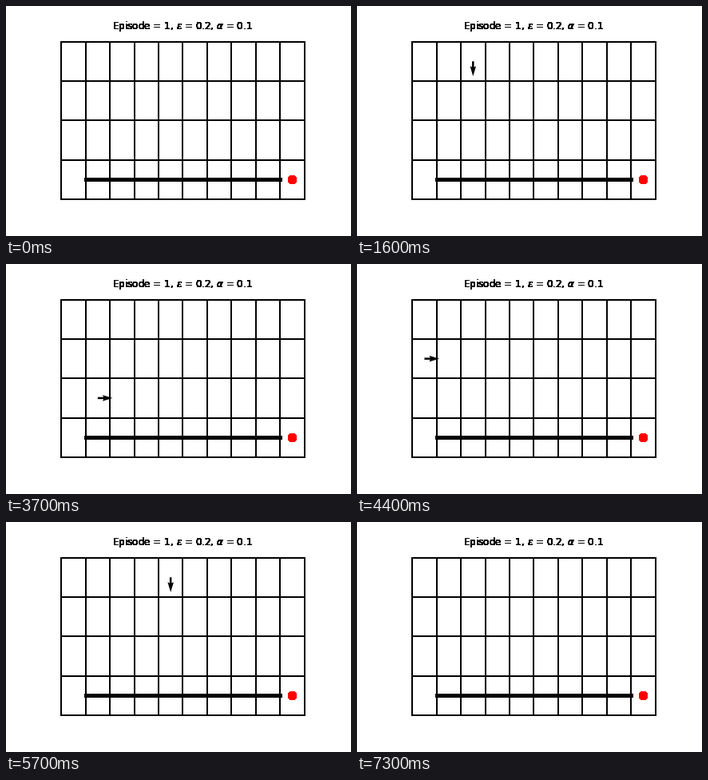
A matplotlib script that plays this animation: 432 px wide and 288 px high, repeating every 7400 ms.

```python
import matplotlib.pyplot as plt
from matplotlib.animation import FuncAnimation

W, H, DPI = 432, 288, 72
COLS, ROWS = 10, 4
FRAMES, INTERVAL = 74, 100
LAYERS = 24  # stacked copies give the text and dot hard edges

MOVES = {"U": (0, 1), "D": (0, -1), "L": (-1, 0), "R": (1, 0)}
ACTIONS = (
    "URRLUUDL" "DUURRLRD" "RRRRURLD"
    "DDUUURRL" "DLDRRRDU" "UUDRDLRR"
    "UDRRRUUL" "DDUURRDR" "URDURDDD"
)


def walk(actions):
    """List (cell, move) for each step; falling off the cliff restarts."""
    x, y = 0, 0
    steps = []
    for action in actions:
        dx, dy = MOVES[action]
        steps.append(((x + 0.5, y + 0.5), (dx, dy)))
        x, y = x + dx, y + dy
        if y == 0 and 0 < x < COLS - 1:
            x, y = 0, 0
    return steps


STEPS = walk(ACTIONS)

fig = plt.figure(figsize=(W / DPI, H / DPI), dpi=DPI, facecolor="white")
ax = fig.add_axes([0.125, 0.11, 0.775, 0.77])
ax.set_axis_off()
ax.set_xlim(-0.5, COLS + 0.5)
ax.set_ylim(-0.2937, 4.2045)

for i in range(COLS + 1):
    ax.plot([i, i], [0, ROWS], color="black", lw=2)
for j in range(ROWS + 1):
    ax.plot([0, COLS], [j, j], color="black", lw=2)

label = r"Episode = 1, $\epsilon$ = 0.2, $\alpha$ = 0.1"
for _ in range(LAYERS):
    ax.plot([1, COLS - 1], [0.5, 0.5], color="black", lw=5)
    ax.plot(COLS - 0.5, 0.5, "o", color="red", ms=10)
    ax.annotate(label, (0.5, 1), xytext=(0, 6), xycoords="axes fraction",
                textcoords="offset points", ha="center", va="baseline",
                fontsize=12, family="DejaVu Sans")

arrow = ax.quiver([0.5], [0.5], [0], [1], color="black", units="width",
                  width=0.0075, scale=18, scale_units="width", zorder=3)


def update(frame):
    shown = 1 <= frame <= len(STEPS)
    arrow.set_visible(shown)
    if shown:
        cell, (dx, dy) = STEPS[frame - 1]
        arrow.set_offsets([cell])
        arrow.set_UVC([dx], [dy])
    return (arrow,)


anim = FuncAnimation(fig, update, frames=FRAMES, interval=INTERVAL,
                     repeat=True, repeat_delay=0, blit=False)
plt.show()
```
